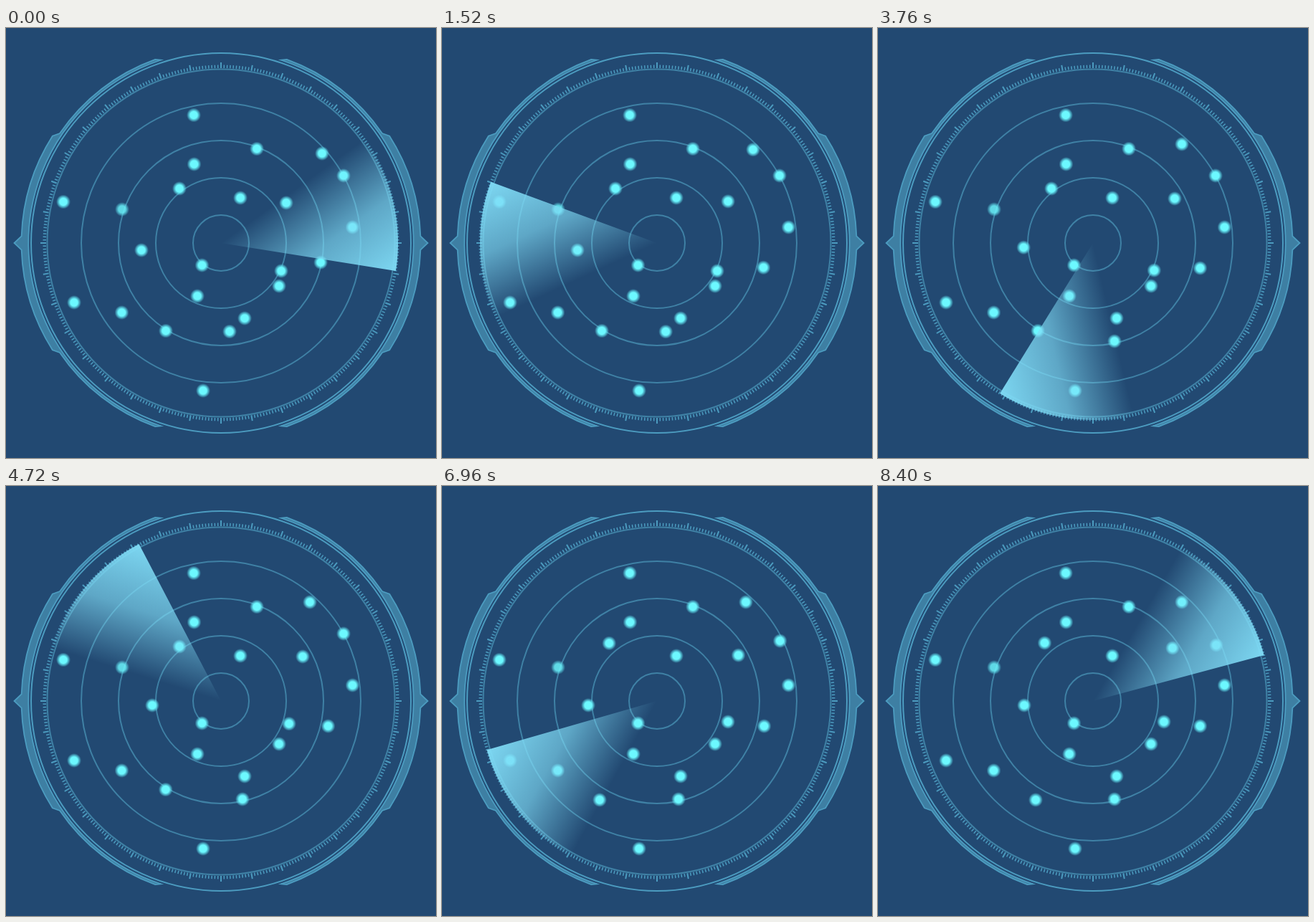
These frames come from a looping animation (600 px wide and 600 px high, 8480 ms). An HTML page with a canvas:

```html
<!DOCTYPE html>
<html lang="en">
<head>
<meta charset="utf-8">
<title>Radar</title>
<style>
html, body { margin: 0; width: 100%; height: 100%; overflow: hidden; background: #224972; }
canvas { display: block; }
</style>
</head>
<body>
<canvas id="stage" width="600" height="600"></canvas>
<script>
const ctx = document.getElementById('stage').getContext('2d');
const LOOP = 8480, STEP = 80, DRIFT = 2000;
const SWEEP_R = 247, SPREAD = 45, SWEEP_START = 9.1, SWEEP_SPEED = 0.1257;
const RAD = Math.PI / 180, DIM = '#3f81a5', BRIGHT = '#4c9cc0';

// Each blip: x, y, then drifts of [start ms, dx, dy]
const blips = [
  [262, 121.5], [350, 168.5], [262.5, 190], [327, 237], [80, 242.5],
  [273.5, 331], [267, 374], [381, 360], [333, 405], [95, 383],
  [161.5, 397], [275, 506], [483.5, 278],
  [439, 327, [-100, 10.5, 8]],
  [441, 175, [640, -17, -13]],
  [391, 244, [720, 23, -6], [6460, -3, -12]],
  [312, 423.5, [1400, 18, 13.5]],
  [189, 310, [2040, 15, -4]],
  [384, 339, [3400, 15, -10]],
  [223, 422.5, [4400, -3, 15.5]],
  [242, 224, [5300, -9.5, -5]],
  [471, 206, [5780, 1, 16]]
];

const polar = (r, deg) => [r * Math.cos(deg * RAD), r * Math.sin(deg * RAD)];

function ease(v) {
  const p = Math.min(1, Math.max(0, v));
  return p * p * (3 - 2 * p);
}

function place([x, y, ...drifts], t) {
  for (const [start, dx, dy] of drifts) {
    const e = ease((t - start) / DRIFT);
    x += dx * e;
    y += dy * e;
  }
  return [x - 300, y - 300];
}

function ring(r, color) {
  ctx.beginPath();
  ctx.arc(0, 0, r, 0, 2 * Math.PI);
  ctx.strokeStyle = color;
  ctx.lineWidth = 2;
  ctx.stroke();
}

function ticks() {
  ctx.strokeStyle = BRIGHT;
  for (let a = 0; a < 360; a++) {
    const major = a % 10 === 0;
    ctx.beginPath();
    ctx.moveTo(...polar(244, a));
    ctx.lineTo(...polar(major ? 252 : 248.5, a));
    ctx.lineWidth = major ? 2 : 1.5;
    ctx.stroke();
  }
}

function bracket(side) {
  const arc = (r, from, to) => ctx.arc(0, 0, r, from * RAD, to * RAD, from > to);
  ctx.save();
  ctx.scale(side, 1);
  ctx.beginPath();
  arc(272, -70.3, -34.2);
  arc(278.5, -32.4, -2);
  ctx.lineTo(288.5, 0);
  arc(278.5, 2, 32.4);
  arc(272, 34.2, 70.3);
  arc(268.7, 71.8, -71.8);
  ctx.closePath();
  ctx.fillStyle = '#3e7fa3';
  ctx.fill();
  ctx.strokeStyle = BRIGHT;
  ctx.lineWidth = 1.8;
  ctx.stroke();
  ctx.restore();
}

function blip([x, y], alpha = 1) {
  const glow = ctx.createRadialGradient(x, y, 0, x, y, 10);
  glow.addColorStop(0, '#6cf8ff');
  glow.addColorStop(0.5, '#6cf8ff');
  glow.addColorStop(0.75, 'rgba(100,236,248,.55)');
  glow.addColorStop(1, 'rgba(90,220,235,0)');
  ctx.globalAlpha = alpha;
  ctx.fillStyle = glow;
  ctx.fillRect(x - 10, y - 10, 20, 20);
  ctx.globalAlpha = 1;
}

function wedge(angle) {
  ctx.save();
  ctx.rotate((angle - SPREAD) * RAD);
  const fade = ctx.createLinearGradient(0, 0, 0, SWEEP_R * Math.sin(SPREAD * RAD));
  fade.addColorStop(0, 'rgba(128,220,246,0)');
  fade.addColorStop(0.5, 'rgba(128,220,246,.64)');
  fade.addColorStop(1, 'rgba(128,220,246,.96)');
  ctx.beginPath();
  ctx.moveTo(0, 0);
  ctx.arc(0, 0, SWEEP_R, 0, SPREAD * RAD);
  ctx.fillStyle = fade;
  ctx.fill();
  ctx.restore();
}

function draw() {
  const t = Math.floor(performance.now() % LOOP / STEP) * STEP;
  ctx.setTransform(1, 0, 0, 1, 300, 300);
  ctx.fillStyle = '#224972';
  ctx.fillRect(-300, -300, 600, 600);
  for (let r = 39; r < 200; r += 52) ring(r, DIM);
  ring(242.5, DIM);
  ring(265, BRIGHT);
  ticks();
  bracket(1);
  bracket(-1);
  for (const b of blips) blip(place(b, t));
  blip([-138, -47], 0.82);
  wedge(SWEEP_START + SWEEP_SPEED * t);
  requestAnimationFrame(draw);
}
draw();
</script>
</body>
</html>
```
